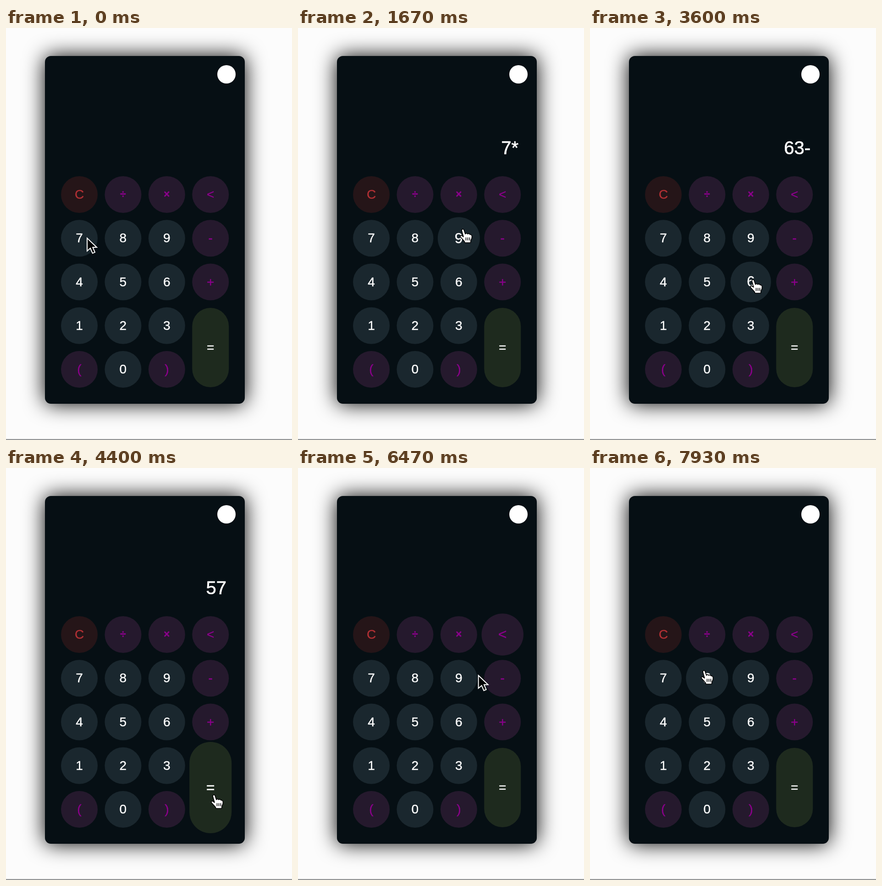
These frames come from a looping animation (624x898 px, 8000 ms). An HTML page:

```html
<!DOCTYPE html>
<html lang="en">
<head>
<meta charset="utf-8">
<title>Calculator</title>
<style>
html, body { margin: 0; width: 100%; height: 100%; overflow: hidden; background: #fcfcfc; }
#panel {
  position: absolute; left: 85px; top: 61px; width: 436px; height: 758px;
  border-radius: 13px; background: #060f14; box-shadow: 0 0 46px #000;
}
svg { position: absolute; left: 0; top: 0; display: block; }
text { font-family: "Liberation Sans", Arial, sans-serif; font-size: 28px; text-anchor: middle; stroke-width: .4px; }
#display { font-size: 40px; text-anchor: end; fill: #fff; stroke: #fff; stroke-width: .7px; }
.num rect { fill: #1a272e; } .num text { fill: #fff; stroke: #fff; }
.op rect { fill: #25192d; } .op text { fill: #8b008b; stroke: #8b008b; }
.clear rect { fill: #251518; } .clear text { fill: #b03034; stroke: #b03034; }
.equal rect { fill: #1e2a1e; } .equal text { fill: #fff; stroke: #fff; }
.op text.small { font-size: 23px; font-weight: bold; }
</style>
</head>
<body>
<div id="panel"></div>
<svg width="624" height="898" viewBox="0 0 624 898">
  <rect y="896" width="624" height="1.6" fill="#707375"/>
  <circle cx="481" cy="101" r="20" fill="#fff"/>
  <text id="display" x="481" y="275"></text>
  <g id="keys"></g>
  <g id="arrow">
    <path d="M1 2V30L8 24L12.8 35L18 32.8L13.3 22H22Z" fill="#000" stroke="#fff" stroke-width="2"/>
  </g>
  <g id="hand" stroke="#000" stroke-width="1.6" stroke-linejoin="round">
    <path d="M-2 3Q0-2 3 2L6 11Q9 8 11 11Q14 9 16 12Q20 12 20.5 16Q21 21 18 25L17.5 30H5L4 27L-5 17Q-5 12-1 15L2 17Z" fill="#fff"/>
    <path d="M7.5 18.5v6.5m4-6.5v6.5m4-6.5v6.5" fill="none"/>
  </g>
</svg>
<script>
const LOOP = 8000, GROW = 250;
const NS = "http://www.w3.org/2000/svg";
const $ = id => document.getElementById(id);

const layout = ["C÷×<", "789-", "456+", "123=", "(0)"];

// Pointer stops: arrival, x, y, optional departure
const stops = [
  [0, 176, 456, 560], [700, 310, 438], [800, 382, 394], [940, 352, 362, 1240],
  [1400, 359, 438, 1840], [2100, 452, 711, 2510], [2668, 448, 592], [2870, 445, 494],
  [2960, 445, 455, 3270], [3500, 355, 548, 3760], [4060, 453, 712, 4640],
  [5100, 450, 360, 6300], [6400, 438, 380], [6470, 393, 450], [6700, 310, 488],
  [6980, 190, 474], [7180, 165, 456, 7290], [7480, 255, 375, 7590], [7760, 248, 441, LOOP]
];

// Hovered key: enter, leave
const hovers = [
  ["7", 260, 615], ["8", 640, 692], ["9", 695, 768], ["×", 830, 1320],
  ["9", 1360, 1890], ["=", 2000, 2663], ["+", 2668, 2855], ["-", 2890, 3340],
  ["6", 3440, 3820], ["=", 3920, 4780], ["+", 4795, 4900], ["-", 4920, 5020],
  ["<", 5045, 6440], ["9", 6510, 6640], ["8", 6740, 6890], ["7", 6940, 7370],
  ["÷", 7430, 7670], ["8", 7680, LOOP]
];

const readout = [
  [0, ""], [530, "7"], [1195, "7*"], [1795, "7*9"], [2465, "63"], [3195, "63-"],
  [3665, "63-6"], [4395, "57"], [5595, "5"], [6125, ""]
];

const keys = {};

function add(tag, parent, attrs) {
  const el = document.createElementNS(NS, tag);
  for (const k in attrs) el.setAttribute(k, attrs[k]);
  return parent.appendChild(el);
}

function kind(ch) {
  if (ch === "C") return "clear";
  if (ch === "=") return "equal";
  return /\d/.test(ch) ? "num" : "op";
}

function makeKey(ch, x, y, h) {
  const g = add("g", $("keys"), { class: kind(ch) });
  const small = "÷×".includes(ch);
  add("rect", g, { x: -40, y: -h / 2, width: 80, height: h, rx: 40 });
  add("text", g, { y: small ? 6.5 : 9, class: small ? "small" : "" }).textContent = ch;
  keys[ch] = { g, x, y };
}

layout.forEach((line, r) => [...line].forEach((ch, c) => {
  const x = 160 + 95.4 * c;
  if (ch === "=") makeKey(ch, x, 696.5, 173);
  else makeKey(ch, x, 363 + 95.25 * r, 80);
}));

function ease(x) {
  x = Math.min(1, Math.max(0, x));
  return x * x * (3 - 2 * x);
}

function growth([, enter, leave], t) {
  if (t < enter) return 0;
  return ease((Math.min(t, leave) - enter) / GROW) * (1 - ease((t - leave) / GROW));
}

function pointer(t) {
  const i = stops.findLastIndex(s => s[0] <= t);
  const [at, x, y, go = at] = stops[i];
  const next = stops[i + 1];
  if (t <= go || !next) return [x, y];
  const k = (t - go) / (next[0] - go);
  return [x + (next[1] - x) * k, y + (next[2] - y) * k];
}

function draw(t) {
  $("display").textContent = readout.findLast(r => r[0] <= t)[1];

  for (const ch in keys) {
    const { g, x, y } = keys[ch];
    const v = Math.max(0, ...hovers.filter(h => h[0] === ch).map(h => growth(h, t)));
    g.setAttribute("transform", `translate(${x} ${y}) scale(${1 + 0.15 * v})`);
  }

  const [x, y] = pointer(t);
  const over = hovers.some(h => t >= h[1] && t < h[2]);
  for (const id of ["arrow", "hand"]) {
    $(id).setAttribute("transform", `translate(${x} ${y})`);
    $(id).setAttribute("visibility", (id === "hand") === over ? "visible" : "hidden");
  }
}

const start = performance.now();
function tick(now) {
  draw(Math.max(0, now - start) % LOOP);
  requestAnimationFrame(tick);
}
draw(0);
requestAnimationFrame(tick);
</script>
</body>
</html>
```
